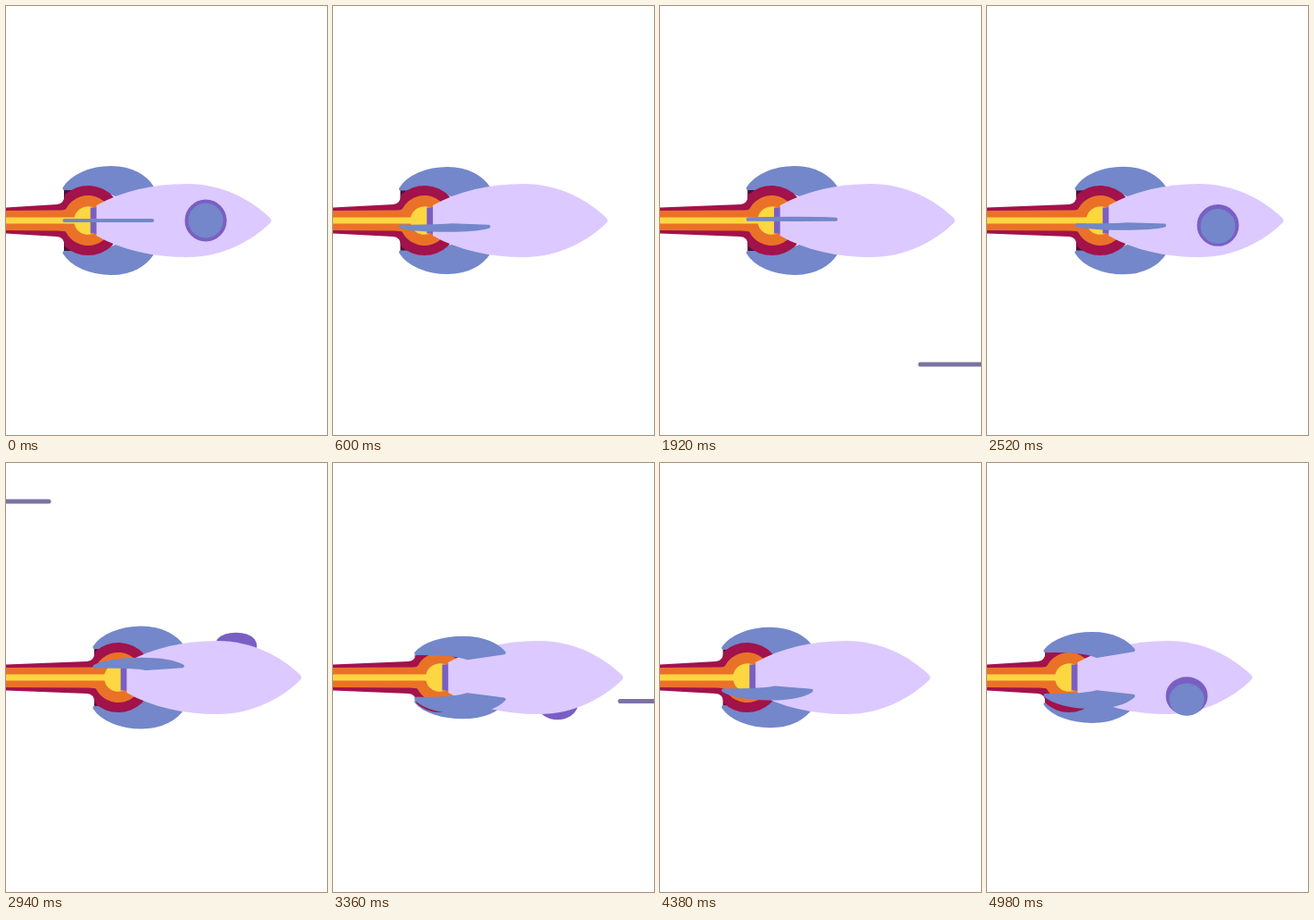
Recreate the animation shown at these times as an HTML page with a canvas. Size 360x480 px, loop 5040 ms.

```html
<!DOCTYPE html>
<html lang="en">
<head>
<meta charset="utf-8">
<title>Spinning rocket</title>
<style>
  html, body { margin: 0; width: 100%; height: 100%; overflow: hidden; background: #fff; }
  canvas { display: block; }
</style>
</head>
<body>
<canvas id="stage" width="360" height="480"></canvas>
<script>
const ctx = document.getElementById('stage').getContext('2d');
const LOOP = 5040, STEP = 60, TURN = -16.94 * Math.PI / 180;
const BODY = '#dcc9ff', BLUE = '#7387ca', PURPLE = '#7a5fc3', DARK = '#4a1236', STAR = '#7b72a2';

// Flame layers: colour, bulb radius, then half-heights at the stage edge, the neck and the bulb
const FLAME = [
  ['#a2124b', 39, 14.5, 18, 29],
  ['#ea7228', 28, 11, 11.5, 13],
  ['#fcd741', 15.8, 3.4, 3.4, 3.4]
];

// Streaks: start time, y, left end at the start
const STREAKS = [
  [120, 86, 340], [300, 374, 300], [720, 131, 330], [1380, 312, 240],
  [1740, 106, 330], [1920, 401, 290], [2280, 111, 320], [2820, 43, 250],
  [3000, 311, 245], [3360, 266.5, 320], [3540, 312, 260], [3900, 62, 235],
  [4080, 360, 230], [4440, 150, 310], [4620, 339, 300]
];
const SPEED = 140 / 60, LENGTH = 80;

// Cubic from 0 to 1 with a given starting slope and a soft end
function ease(p, slope) {
  p = Math.min(1, Math.max(0, p));
  return p * p * (3 - 2 * p) + slope * p * (1 - p) ** 2;
}

function drift(t) {
  return 35 * (ease(t / 2300, 0.92) - ease((t - 2700) / 2250, 0));
}

function disc(x, y, rx, ry, color, line) {
  ctx.beginPath();
  ctx.ellipse(x, y, rx, ry, 0, 0, 2 * Math.PI);
  ctx.fillStyle = ctx.strokeStyle = color;
  ctx.lineWidth = line;
  ctx.fill();
  ctx.stroke();
}

function drawStreaks(t) {
  ctx.strokeStyle = STAR;
  ctx.lineWidth = 5;
  for (const [start, y, x0] of STREAKS) {
    const x = x0 - (t - start) * SPEED;
    if (t < start || x < -LENGTH) continue;
    ctx.beginPath();
    ctx.moveTo(x + 2, y);
    ctx.lineTo(x + LENGTH - 2, y);
    ctx.stroke();
  }
}

// Points of the fin are (x, radius); s squeezes the radius as the fin turns
function drawFin(s) {
  ctx.beginPath();
  ctx.moveTo(65.5, 36 * s);
  ctx.bezierCurveTo(74, 50 * s, 95, 59 * s, 118, 59 * s);
  ctx.bezierCurveTo(142, 59 * s, 157, 48 * s, 164, 37 * s);
  ctx.lineTo(123, 29 * s);
  ctx.quadraticCurveTo(108, 37 * s, 65.5, 36 * s);
  ctx.closePath();
  ctx.fillStyle = ctx.strokeStyle = BLUE;
  ctx.lineWidth = 4;
  ctx.fill();
  ctx.stroke();
}

function drawWindow(a) {
  const c = Math.cos(a), s = Math.sin(a);
  disc(224, 37 * s, 12, 12 * Math.abs(c), PURPLE, 23);
  if (c > 0) disc(224, 44 * s, 8, 8 * c, BLUE, 23);
}

function drawFlame(dx) {
  for (const [color, r, edge, neck, h] of FLAME) {
    const open = Math.asin(h / r), x = 92 - r * Math.cos(open);
    ctx.fillStyle = color;
    ctx.beginPath();
    ctx.moveTo(-dx, -edge);
    ctx.lineTo(x - 9, -neck);
    ctx.quadraticCurveTo(x - 1, -neck, x, -h);
    ctx.arc(92, 0, r, Math.PI + open, 3 * Math.PI - open);
    ctx.quadraticCurveTo(x - 1, neck, x - 9, neck);
    ctx.lineTo(-dx, edge);
    ctx.fill();
  }
}

function drawBody() {
  ctx.fillStyle = PURPLE;
  ctx.fillRect(94.7, -14.5, 8, 29);
  ctx.beginPath();
  ctx.moveTo(101.5, -17);
  ctx.bezierCurveTo(130, -33, 165, -41, 203, -41);
  ctx.bezierCurveTo(243, -41, 275, -23, 296, -3);
  ctx.quadraticCurveTo(299, 0, 296, 3);
  ctx.bezierCurveTo(275, 23, 243, 41, 203, 41);
  ctx.bezierCurveTo(165, 41, 130, 33, 101.5, 17);
  ctx.closePath();
  ctx.fillStyle = BODY;
  ctx.fill();
}

function draw(t) {
  const dx = drift(t), spin = TURN * t / STEP;
  const fins = [0, 1, 2, 3].map(i => spin + i * Math.PI / 2);
  const inFront = a => Math.cos(a) > 0.46;

  ctx.clearRect(0, 0, 360, 480);
  ctx.lineCap = ctx.lineJoin = 'round';
  drawStreaks(t);

  ctx.save();
  ctx.translate(dx, 240);
  const gap = 36 * Math.max(Math.abs(Math.cos(spin)), Math.abs(Math.sin(spin)));
  ctx.fillStyle = DARK;
  ctx.fillRect(65, -gap, 50, 2 * gap);
  fins.filter(a => !inFront(a)).forEach(a => drawFin(Math.sin(a)));
  const windowFront = Math.cos(spin) > 0;
  if (!windowFront) drawWindow(spin);
  drawFlame(dx);
  drawBody();
  if (windowFront) drawWindow(spin);
  fins.filter(inFront).forEach(a => drawFin(Math.sin(a)));
  ctx.restore();
}

const begin = performance.now();
function tick() {
  const t = (performance.now() - begin) % LOOP;
  draw(Math.floor(t / STEP) * STEP);
  requestAnimationFrame(tick);
}
tick();
</script>
</body>
</html>
```
